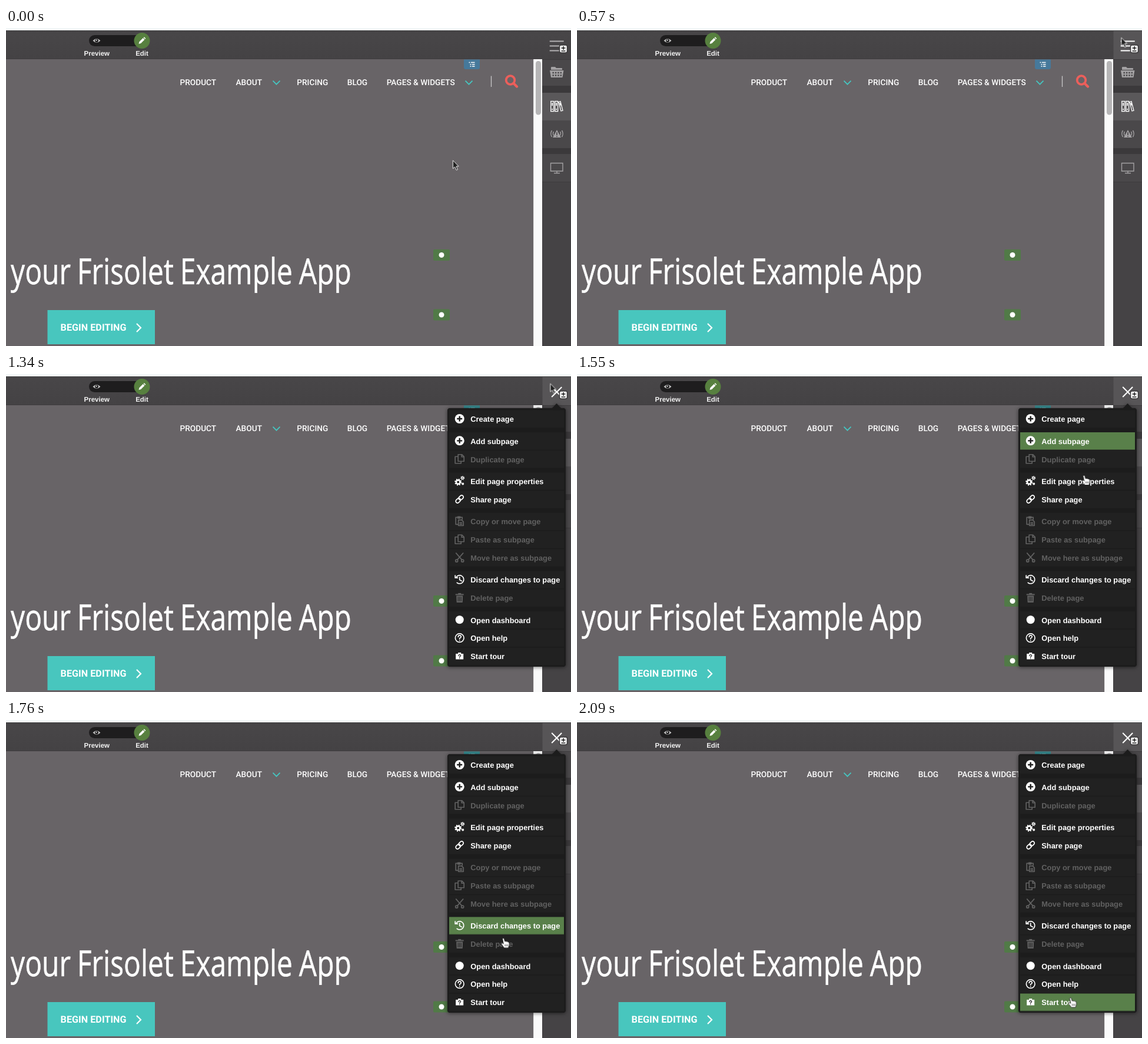
An HTML page that plays this animation: 960 by 540 pixels, repeating every 3090 ms.

```html
<!DOCTYPE html>
<html lang="en">
<head>
<meta charset="utf-8">
<title>Page menu</title>
<style>
  html, body { margin: 0; width: 100%; height: 100%; overflow: hidden; background: #686467; }
  svg { display: block; width: 100vw; height: 100vh; text-rendering: geometricPrecision; }
  .nav { font: 500 13.7px Roboto, sans-serif; fill: #fff; }
  .title { font: 400 61px "Open Sans", sans-serif; fill: #fff; stroke: #fff; stroke-width: .6; word-spacing: -2px; }
  .cta { font: 700 16.2px Roboto, sans-serif; fill: #fff; }
  .mode { font: 700 11.5px "Liberation Sans", Arial, sans-serif; fill: #f2f2f2; text-anchor: middle; }
  .label { font: 700 12.85px "Liberation Sans", Arial, sans-serif; }
  .line { fill: none; stroke: currentColor; stroke-width: 1.7; stroke-linecap: round; stroke-linejoin: round; }
  .solid { fill: currentColor; }

  .anim { animation: 3090ms linear infinite; }
  .lit { animation-name: lit; animation-timing-function: step-end; }
  .menu { animation-name: open; animation-timing-function: step-end; }
  .badge { animation-name: dim; animation-timing-function: step-end; }
  .hover { animation-name: hover; animation-timing-function: step-end; }
  .arrow { animation-name: arrow; animation-timing-function: step-end; }
  .hand { animation-name: hand; animation-timing-function: step-end; }
  .burger { animation-name: brighten; animation-timing-function: step-end; }
  .top { animation-name: top; }
  .mid { animation-name: mid; }
  .low { animation-name: low; }
  .pointer { animation-name: travel; }

  @keyframes lit { 0% { opacity: 0 } 13.6%, 100% { opacity: 1 } }
  @keyframes brighten { 0% { color: #b3b1b3 } 13.6%, 100% { color: #fff } }
  @keyframes open { 0% { visibility: hidden } 34.6%, 100% { visibility: visible } }
  @keyframes dim { 0% { color: #46799b } 34.6%, 100% { color: #35868b } }
  @keyframes arrow { 0% { opacity: 1 } 46.6%, 100% { opacity: 0 } }
  @keyframes hand { 0% { opacity: 0 } 46.6%, 100% { opacity: 1 } }
  @keyframes top {
    0%, 34.8% { transform: translateY(-8px); animation-timing-function: ease }
    45%, 100% { transform: rotate(45deg) }
  }
  @keyframes mid {
    0%, 34.8% { opacity: 1; animation-timing-function: ease }
    42%, 100% { opacity: 0 }
  }
  @keyframes low {
    0%, 34.8% { transform: translateY(8px); animation-timing-function: ease }
    45%, 100% { transform: rotate(-45deg) }
  }
  @keyframes travel {
    0%, .9% { transform: translate(759px, 224px); animation-timing-function: cubic-bezier(.4, 0, .4, 1) }
    18.4%, 43.4% { transform: translate(924.5px, 15.5px); animation-timing-function: cubic-bezier(.45, 0, .6, .52) }
    50.16% { transform: translate(861.5px, 171px) }
    56.96% { transform: translate(845px, 369.5px); animation-timing-function: cubic-bezier(.2, .6, .3, 1) }
    67.6%, 100% { transform: translate(838.5px, 471.5px) }
  }
  @keyframes hover {
    0% { opacity: 0; transform: translateY(77px) }
    46.6% { opacity: 1; transform: translateY(77px) }
    47.9% { opacity: 1; transform: translateY(114px) }
    50.5% { opacity: 1; transform: translateY(182.5px) }
    51.6% { opacity: 1; transform: translateY(213.5px) }
    53.4% { opacity: 0; transform: translateY(213.5px) }
    56.1% { opacity: 1; transform: translateY(349.5px) }
    57.9% { opacity: 0; transform: translateY(349.5px) }
    58.4% { opacity: 1; transform: translateY(418px) }
    60% { opacity: 1; transform: translateY(449px) }
    63.6%, 100% { opacity: 1; transform: translateY(479.5px) }
  }
</style>
</head>
<body>
<svg viewBox="0 0 960 540">
  <defs>
    <linearGradient id="bar" x2="0" y2="1">
      <stop offset="0" stop-color="#454345"/><stop offset=".15" stop-color="#484648"/><stop offset="1" stop-color="#444244"/>
    </linearGradient>
    <filter id="shade" x="-10%" y="-10%" width="120%" height="120%">
      <feDropShadow dx="0" dy="1" stdDeviation="3" flood-color="#000" flood-opacity=".55"/>
    </filter>
    <g id="plus">
      <circle class="solid" r="8"/>
      <path d="M-4.5 0H4.5M0-4.5V4.5" stroke="#1e1e1e" stroke-width="2.4"/>
    </g>
    <g id="copy" class="line">
      <path d="M-2.5-7.5H4L7.5-4V4H-2.5ZM3.5-7.5V-3.5H7.5M-2.5-4H-7.5V7.5H2.5V4"/>
    </g>
    <g id="gears" fill="none" stroke="currentColor">
      <circle cx="-2.5" cy="2" r="3.3" stroke-width="2.6"/>
      <circle cx="-2.5" cy="2" r="5" stroke-width="2" stroke-dasharray="2 1.927"/>
      <circle cx="5" cy="-5" r="1.7" stroke-width="1.5"/>
      <circle cx="5" cy="-5" r="2.9" stroke-width="1.3" stroke-dasharray="1.3 1.3"/>
      <circle cx="5.5" cy="5" r="1.2" stroke-width="1.6"/>
    </g>
    <g id="link" class="line">
      <g transform="rotate(-45)">
        <rect x="-8" y="-3" width="9" height="6" rx="3"/><rect x="-1" y="-3" width="9" height="6" rx="3"/>
      </g>
    </g>
    <g id="paste" class="line">
      <path d="M-2 5.5H-6.5V-6.5H4.5V-3M-3-7.5H1V-5H-3ZM-2-2H3.5L6.5 1V7.5H-2ZM.5 2.5H4M.5 5H4"/>
    </g>
    <g id="cut" class="line">
      <path d="M-6-7.5L4 4M6-7.5L-4 4"/><circle cx="-5" cy="5.5" r="2"/><circle cx="5" cy="5.5" r="2"/>
    </g>
    <g id="history" class="line">
      <path d="M-6-3.5A7 7 0 1 1-4.5 5.3M-7.5-7V-2.8H-3.3M0-4V.5L3.5 2.5"/>
    </g>
    <g id="trash" class="solid">
      <path d="M-7-6.5H-2.5V-8H2.5V-6.5H7V-4.5H-7ZM-5.5-3.5H5.5L5 8H-5Z"/>
      <path d="M-2.5-1.5V6M0-1.5V6M2.5-1.5V6" stroke="#1e1e1e"/>
    </g>
    <circle id="dash" class="solid" r="7"/>
    <path id="ask" class="line" d="M-2.4-1.8Q-2.2-4.2 0-4.2Q2.5-4.2 2.5-2Q2.5-.7 0 .7V1.7M0 4.2V4.3"/>
    <g id="help"><circle class="line" r="7.3"/><use href="#ask"/></g>
    <g id="tour">
      <path class="solid" d="M-6.5-4H-2.5V-6H2.5V-4H6.5V5.5H-6.5Z"/>
      <use href="#ask" color="#1e1e1e" transform="translate(0 .8) scale(.75)"/>
    </g>
    <path id="chev" d="M-6-3L0 3L6-3" fill="none" stroke-width="1.8"/>
    <g id="tag">
      <rect x="-14" y="-9.5" width="28" height="19" rx="2" fill="#517a47"/><circle r="4.5" fill="#fff"/>
    </g>
  </defs>

  <rect width="960" height="540" fill="#686467"/>
  <rect y="4" width="960" height="49" fill="url(#bar)"/>
  <rect width="960" height="4" fill="#f3f9f9"/>
  <path d="M0 52.5H896" stroke="#3f3d3f"/>

  <!-- mode switch -->
  <rect x="141" y="12" width="103" height="19" rx="9.5" fill="#1e1d1e"/>
  <path d="M147.5 21.5Q154 14.5 160.5 21.5Q154 28 147.5 21.5Z" fill="#c4c4c4"/>
  <circle cx="154" cy="21.3" r="2.9" fill="#1e1d1e"/><circle cx="153.5" cy="20.7" r="1.2" fill="#c4c4c4"/>
  <circle cx="231" cy="21.5" r="13.5" fill="#57803f"/>
  <path d="M225.5 27L226.5 23.3L232.8 17L235.5 19.7L229.2 26ZM233.6 16.2L234.8 15.2L237.4 17.8L236.3 18.9Z" fill="#fff"/>
  <text class="mode" x="154.3" y="47">Preview</text>
  <text class="mode" x="231" y="47">Edit</text>

  <!-- page -->
  <g class="nav">
    <text x="295.5" y="97.2">PRODUCT</text>
    <text x="390.5" y="97.2">ABOUT</text>
    <text x="494.3" y="97.2">PRICING</text>
    <text x="579.8" y="97.2">BLOG</text>
    <text x="646.8" y="97.2">PAGES &amp; WIDGETS</text>
  </g>
  <use href="#chev" x="459.5" y="92.7" stroke="#45c5c0"/>
  <use href="#chev" x="786.5" y="92.7" stroke="#45c5c0"/>
  <path d="M824.5 81.5V100" stroke="#c9c7c9" stroke-width="1.3"/>
  <g fill="none" stroke="#ec5f5b" stroke-width="3.8">
    <circle cx="857" cy="88.5" r="7.3"/><path d="M862.5 94L868 99.5" stroke-width="4.4" stroke-linecap="round"/>
  </g>
  <g class="anim badge" color="#46799b">
    <path class="solid" d="M778 53.5H805V67Q805 70 802 70H781Q778 70 778 67Z"/>
    <path d="M786.5 58.5H788.5M790 58.5H796.5M788.5 61.7H790.5M792 61.7H796.5M788.5 65H790.5M792 65H796.5" stroke="#fff" stroke-width="1.6"/>
  </g>
  <text class="title" transform="translate(8 435) scale(.785 1)">your Frisolet Example App</text>
  <rect x="70.5" y="479" width="182.5" height="58" fill="#48c6be"/>
  <text class="cta" x="92.6" y="513.5">BEGIN EDITING</text>
  <path d="M222 502L229 509L222 516" fill="none" stroke="#fff" stroke-width="2.2"/>
  <use href="#tag" x="740" y="385.5"/>
  <use href="#tag" x="740" y="487"/>

  <rect x="896" y="53" width="16" height="487" fill="#fafafa"/>
  <path d="M896.5 53V540" stroke="#e2e2e2"/>
  <rect x="900" y="56" width="9" height="91.5" rx="4.5" fill="#b6b5b6"/>

  <!-- sidebar -->
  <rect x="911" y="53" width="49" height="487" fill="#454345"/>
  <path d="M911 53H960V98H911ZM911 157H960V204H911ZM911 214H960V261H911Z" fill="#4a484a"/>
  <path d="M911 98H960V110H911ZM911 204H960V214H911Z" fill="#3b393b"/>
  <rect x="911" y="110" width="49" height="47" fill="#5a585a"/>
  <path d="M911 53.5H960M911 261.5H960" stroke="#3d3b3d"/>
  <g fill="#a3a1a3">
    <path d="M926 71V67Q926 66 927 66H933L935 68H944Q945 68 945 69V71ZM924 72H947.5L945.5 84H926Z"/>
    <path d="M928.5 76H944M928.5 80.5H944" stroke="#4a484a" stroke-width="2.6" stroke-dasharray="2.4 2"/>
    <path d="M936 173L943 186H929Z"/>
    <path d="M936 177V182M936 183.5V185" stroke="#4a484a" stroke-width="1.7"/>
  </g>
  <g fill="none" stroke="#a3a1a3" stroke-width="1.4">
    <path d="M930.5 176Q928.5 179 930.5 182.500M927.5 174Q924 179.5 927.5 185M941.5 176Q943.5 179 941.5 182.5M944.5 174Q948 179.5 944.5 185"/>
    <path d="M925.5 229.5H946V243H925.5ZM936 243V246M931 246.5H941"/>
  </g>
  <g fill="none" stroke="#fff" stroke-width="1.3">
    <path d="M925.7 124.5H930.7V141.5H925.7ZM932.7 124.5H937.7V141.5H932.7ZM939 125.5L942 124.6L946 140L943 141Z"/>
    <path d="M928.2 127V132M935.2 127V132M941.2 127L942.4 131.5" stroke-width="1.8"/>
    <path d="M928.2 137V139M935.2 137V139" stroke-width="1.8"/>
  </g>

  <!-- menu button -->
  <rect class="anim lit" x="911.5" y="5" width="48.5" height="48" fill="#575557"/>
  <g transform="translate(935.7 30.5)">
    <g class="anim burger" stroke="currentColor" stroke-width="2">
      <path class="anim top" d="M-12 0H12"/><path class="anim mid" d="M-12 0H12"/><path class="anim low" d="M-12 0H12"/>
    </g>
  </g>
  <rect x="940.5" y="29" width="13" height="13" rx="2.5" fill="#fff" stroke="#3a383a" stroke-width="1.5"/>
  <path d="M943.5 34H950.5M947 31V37M943.5 39H950.5" stroke="#222" stroke-width="1.6"/>

  <g class="anim menu">
    <path d="M754 58H928L935.5 50L943 58H947Q951 58 951 62V493Q951 497 947 497H754Q750 497 750 493V62Q750 58 754 58Z" fill="#1a1a1a" filter="url(#shade)"/>
    <g id="stripes" fill="#212121"></g>
    <rect class="anim hover" x="753" y="-15" width="195" height="29.5" fill="#59804a"/>
    <g id="rows" class="label"></g>
  </g>

  <g class="anim pointer">
    <path class="anim arrow" d="M.4 .8V14.8L3.6 11.900L6.200 17.400L8.500 16.400L6 10.900H10.200Z" fill="#222" stroke="#e8e8e8" stroke-linejoin="round"/>
    <g class="anim hand">
      <path d="M-1.5 1Q0-1 1.5 1L2.5 5.5Q4 4.5 5 6Q6.5 5 7.5 6.5Q9.5 6 10 8V12L8.5 16.5H1.5L-3 10.5Q-3.5 8.5-1.5 8.5L.3 9.7Z" fill="#fff" stroke="#222" stroke-width=".9" stroke-linejoin="round"/>
      <path d="M3 10.5V14M5.2 10.5V14M7.4 10.5V14" stroke="#333" stroke-width=".8"/>
    </g>
  </g>
</svg>
<script>
  const off = true;
  const groups = [
    [['plus', 'Create page']],
    [['plus', 'Add subpage'], ['copy', 'Duplicate page', off]],
    [['gears', 'Edit page properties'], ['link', 'Share page']],
    [['paste', 'Copy or move page', off], ['copy', 'Paste as subpage', off], ['cut', 'Move here as subpage', off]],
    [['history', 'Discard changes to page'], ['trash', 'Delete page', off]],
    [['dash', 'Open dashboard'], ['help', 'Open help'], ['tour', 'Start tour']]
  ];
  let y = 76.7, stripes = '', rows = '';
  for (const group of groups) {
    for (const [icon, label, disabled] of group) {
      const color = disabled ? '#616161' : '#fff';
      stripes += `<rect x="753" y="${y - 15}" width="195" height="29.5"/>`;
      rows += `<g color="${color}" fill="${color}"><use href="#${icon}" x="770.7" y="${y - .7}"/>` +
        `<text x="789.3" y="${y + 4.6}">${label}</text></g>`;
      y += 30.9;
    }
    y += 6.45;
  }
  document.getElementById('stripes').innerHTML = stripes;
  document.getElementById('rows').innerHTML = rows;
</script>
</body>
</html>
```
